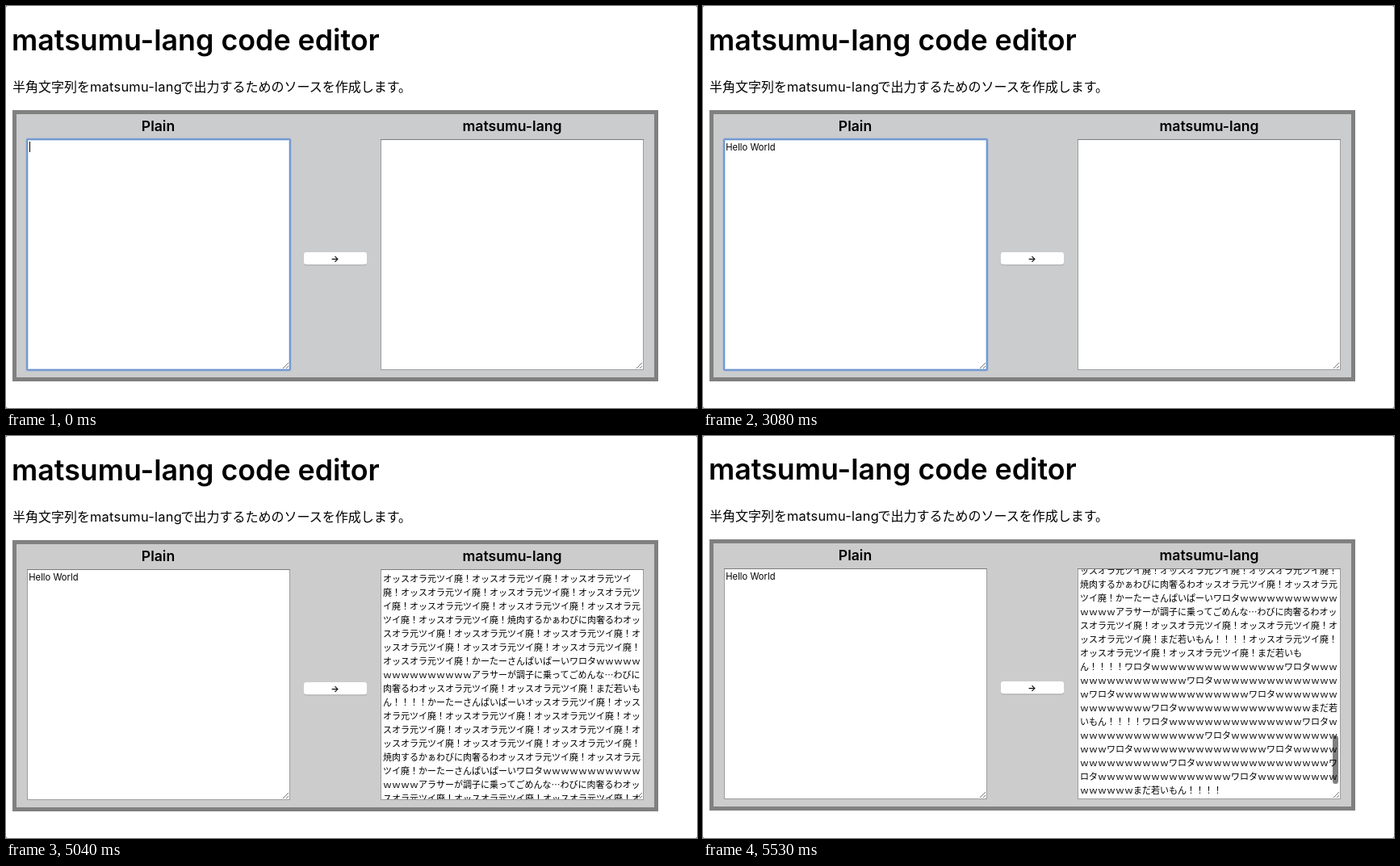
Recreate the animation shown at these times as an HTML page. Size 856 px wide and 498 px high, loop 5600 ms.

```html
<!DOCTYPE html>
<html lang="ja">
<head>
<meta charset="utf-8">
<title>matsumu-lang code editor</title>
<style>
html, body { margin: 0; width: 100%; height: 100%; overflow: hidden; background: #777; }
svg { display: block; }
text { font-family: Inter, "Noto Sans CJK JP", "Noto Sans CJK", sans-serif; fill: #000; }
.jp { font-family: "Noto Sans CJK JP", "Noto Sans CJK", sans-serif; }
.h1 { font-size: 35.8px; font-weight: 600; }
.h2 { font-size: 17.6px; font-weight: 600; text-anchor: middle; }
.area { fill: #fff; stroke: #9d9d9d; }
.edge { fill: none; stroke: #7c7c7c; }
.grip { fill: none; stroke: #777; }
</style>
</head>
<body>
<svg width="856" height="498" viewBox="0 0 856 498">
  <rect width="856" height="498" rx="2.5" fill="#fff"/>
  <g id="page">
    <text class="h1" x="7" y="55">matsumu-lang code editor</text>
    <g font-size="16">
      <text class="jp" x="8" y="106">半角文字列を</text>
      <text x="104" y="106" font-size="16.4" letter-spacing=".25">matsumu-lang</text>
      <text class="jp" x="216.5" y="106">で出力するためのソースを作成します。</text>
    </g>
    <rect id="panel" x="10.5" y="131.5" width="795" height="331" stroke="#808080" stroke-width="5"/>
    <text class="h2" x="188.5" y="155">Plain</text>
    <text class="h2" x="627" y="155">matsumu-lang</text>

    <rect class="area" x="26.5" y="165.5" width="325" height="285"/>
    <path class="edge" d="M26 165.5h326"/>
    <g id="ring" fill="none">
      <rect x="24.5" y="163.5" width="329" height="289" rx="2.5" stroke="#b2bfd5"/>
      <rect x="25.5" y="164.5" width="327" height="287" rx="1.5" stroke="#7e9fd0"/>
      <rect x="26.5" y="165.5" width="325" height="285" stroke="#6b93cc"/>
      <rect x="27.5" y="166.5" width="323" height="283" stroke="#cfdef3"/>
    </g>
    <text id="typed" x="28.3" y="179" font-size="11.2" xml:space="preserve"></text>
    <rect id="caret" y="168" width="1" height="13"/>
    <path class="grip" d="M343 449l7-7M347 449l3-3"/>

    <rect id="shadow" x="369" y="306" width="78" height="15.5" rx="3" fill="#adadad"/>
    <rect x="369" y="305" width="78" height="15.3" rx="3" fill="#fff"/>
    <text x="407.5" y="317" font-size="11" font-weight="600" text-anchor="middle">→</text>

    <rect class="area" x="464.5" y="165.5" width="325" height="285"/>
    <path class="edge" d="M464 165.5h326"/>
    <svg x="465" y="166" width="324" height="284" overflow="hidden">
      <g id="code" font-size="11"></g>
    </svg>
    <rect id="thumb" x="780" width="7" height="60" rx="3.5" fill="#000" fill-opacity=".5"/>
    <path class="grip" d="M781 449l7-7M785 449l3-3"/>
  </g>
</svg>
<script>
const $ = id => document.getElementById(id);
const show = (id, on) => $(id).setAttribute('visibility', on ? 'visible' : 'hidden');
const LOOP = 5600, STEP = 70, BLUR = 3150, RESULT = 4270, SCROLL = 5040, BOUNCE = 5320;
const PLAIN = 'Hello World';
const KEYS = [420, 630, 770, 910, 1050, 1260, 1750, 1960, 2100, 2240, 2450];

// Vocabulary and program of the generated code: word key plus repeat count
const WORDS = {
  o: 'オッスオラ元ツイ廃！', y: '焼肉するかぁ', b: 'わびに肉奢るわ',
  k: 'かーたーさんぱいぱーい', w: 'ワロタ' + 'ｗ'.repeat(15),
  a: 'アラサーが調子に乗ってごめんな…', m: 'まだ若いもん！！！！'
};
const PROGRAM = 'o10 y b o7 k w a b o2 m k o10 y b o2 k w a b o4 m o3 m w6 m w8 m';
const code = PROGRAM.split(' ').map(s => WORDS[s[0]].repeat(+s.slice(1) || 1)).join('');

// Wrap at 29 characters; a line may not start with ！ or …
const lines = [''];
for (const unit of code.match(/[^！…][！…]*/g)) {
  if (lines[lines.length - 1].length + unit.length > 29) lines.push('');
  lines[lines.length - 1] += unit;
}
$('code').innerHTML = lines.map((s, i) =>
  `<text class="jp" x="2" y="${14.5 + 17 * i}">${s}</text>`).join('');

function draw(now) {
  const t = Math.floor(now % LOOP / STEP) * STEP;
  const count = KEYS.filter(k => k <= t).length;
  const focus = t < BLUR;
  $('typed').textContent = PLAIN.slice(0, count);
  $('caret').setAttribute('x', 29 + Math.floor(count && $('typed').getComputedTextLength()));
  const idle = t - (KEYS[count - 1] || 0);
  show('caret', focus && (t < KEYS[10] || idle < 500));
  show('ring', focus);
  $('panel').setAttribute('fill', focus ? '#cbccce' : '#cccccc');
  show('shadow', focus || t >= RESULT);
  show('code', t >= RESULT);

  const p = Math.min(1, Math.max(0, (t - SCROLL) / 210));
  const ease = p * p * (3 - 2 * p);
  $('code').setAttribute('transform', `translate(0 ${-212.5 * ease})`);
  $('thumb').setAttribute('y', 168 + 204 * ease);
  show('thumb', p > 0);

  const lift = Math.max(0, 4 - Math.abs(t - BOUNCE) / (t < BOUNCE ? 35 : 70));
  $('page').setAttribute('transform', `translate(0 ${-lift})`);
}

const start = performance.now();
function tick() {
  draw(performance.now() - start);
  requestAnimationFrame(tick);
}
tick();
</script>
</body>
</html>
```
